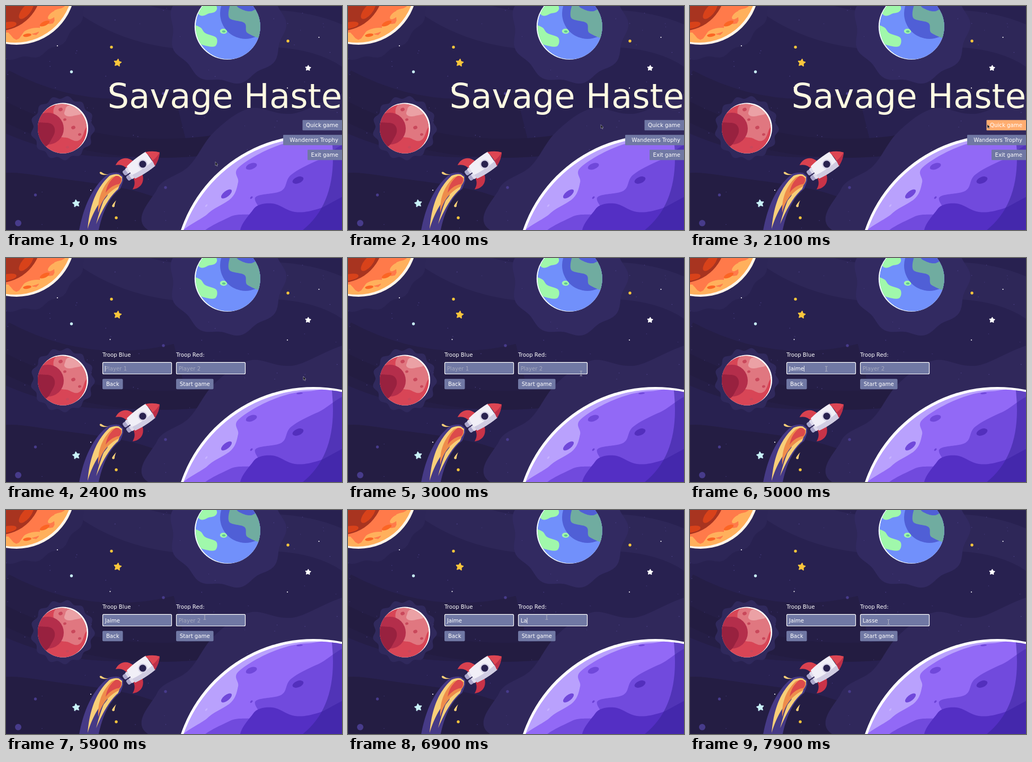
An HTML page for the animation above (8 s loop, 634 by 422 pixels).

```html
<!DOCTYPE html>
<html lang="en">
<head>
<meta charset="utf-8">
<title>Space menu</title>
<style>
  html, body { margin: 0; width: 100%; height: 100%; overflow: hidden; background: #282150; }
  svg { display: block; width: 100%; height: 100%; }
  text { font-family: "DejaVu Sans", sans-serif; font-size: 10.2px; fill: #fff; white-space: pre; }
</style>
</head>
<body>
<svg id="stage" viewBox="0 0 634 422" xmlns="http://www.w3.org/2000/svg">
  <g id="sky"></g>
  <g id="planets"></g>
  <g id="flame"></g>
  <g transform="translate(258 298) rotate(-35)">
    <g id="fins"></g>
    <path d="M-27-14Q-5-18 18-16V16Q-5 18-27 14Q-30 0-27-14Z" fill="#f1eff7"/>
    <path d="M-28 5Q-4 9 19 6L18 16Q-5 18-27 14Z" fill="#d0cce2"/>
    <path d="M17-16Q31-10 39 0Q31 10 17 16Q21 0 17-16Z" fill="#dd4653"/>
    <path d="M19 5Q28 5 39 0Q31 10 17 16Z" fill="#bd2f48"/>
    <circle r="9" fill="#d8d4e8"/>
    <circle r="6.600" fill="#29224f"/>
  </g>
  <g id="stars"></g>
  <g id="menu">
    <text x="634" y="192" text-anchor="end" style="font-size:64px;fill:#fffbe2">Savage Haste</text>
  </g>
  <g id="form">
    <text x="182" y="185.500">Troop Blue</text>
    <text x="321" y="185.500">Troop Red:</text>
  </g>
  <path id="arrow" d="M0 0V7.200L1.700 5.700L2.900 8.300L4 7.800L2.800 5.300H5Z" fill="#111" stroke="#c9c7d6" stroke-width=".55"/>
  <path id="beam" d="M-2.200-4.500H-.6L0-4L.6-4.500H2.200M0-4V4M-2.200 4.500H-.6L0 4L.6 4.500H2.200" fill="none" stroke="#b9bac6" stroke-width=".9"/>
</svg>
<script>
const $ = id => document.getElementById(id);

function add(parent, tag, attrs, text) {
  const el = document.createElementNS("http://www.w3.org/2000/svg", tag);
  for (const k in attrs) el.setAttribute(k, attrs[k]);
  if (text) el.textContent = text;
  return (typeof parent === "string" ? $(parent) : parent).appendChild(el);
}
const dot = (g, fill, cx, cy, r) => add(g, "circle", { cx, cy, r, fill });
const oval = (g, fill, cx, cy, rx, ry, turn = 0) =>
  add(g, "ellipse", { cx, cy, rx, ry, fill, transform: `rotate(${turn} ${cx} ${cy})` });
const polygon = (g, fill, points, more) => add(g, "polygon", { points: points.join(" "), fill, ...more });
const band = (stroke, width, d) => add("sky", "path", { d, stroke, "stroke-width": width, fill: "none" });

// Closed smooth curve through "x,y x,y ..." points.
function blob(g, fill, points) {
  const p = points.split(" ").map(s => s.split(",").map(Number));
  const at = i => p[(i + p.length) % p.length];
  let d = "M" + p[0];
  p.forEach((a, i) => {
    const [z, b, c] = [at(i - 1), at(i + 1), at(i + 2)];
    const h1 = a.map((v, k) => v + (b[k] - z[k]) / 6);
    const h2 = b.map((v, k) => v - (c[k] - a[k]) / 6);
    d += `C${h1} ${h2} ${b}`;
  });
  return add(g, "path", { d: d + "Z", fill });
}

// Ellipse with a rippled edge.
function ripple(g, fill, cx, cy, rx, ry, lobes, depth, phase = 0) {
  const points = [...Array(120).keys()].map(i => {
    const a = i * Math.PI / 60, q = 1 + depth * Math.sin(a * lobes + phase);
    return [cx + rx * q * Math.cos(a), cy + ry * q * Math.sin(a)];
  });
  return polygon(g, fill, points);
}

// Round-headed streak along a quadratic curve; taper 1 ends in a point.
function streak(fill, from, bend, to, width, taper = 1) {
  const left = [], right = [];
  for (let i = 0; i <= 30; i++) {
    const s = i / 30, r = 1 - s;
    const [x, y] = [0, 1].map(k => r * r * from[k] + 2 * r * s * bend[k] + s * s * to[k]);
    const [dx, dy] = [0, 1].map(k => r * (bend[k] - from[k]) + s * (to[k] - bend[k]));
    const w = width * Math.sqrt(Math.min(1, 6 * s)) * (1 - taper * s) / Math.hypot(dx, dy);
    left.push([x - dy * w, y + dx * w]);
    right.unshift([x + dy * w, y - dx * w]);
  }
  polygon("flame", fill, [...left, ...right]);
}

// Rim circle with the body shifted inside it, so the rim shows on one side.
function planet(id, rim, fill, cx, cy, r, dx, dy, inset) {
  const clip = add("planets", "clipPath", { id: "clip-" + id });
  dot(clip, fill, cx, cy, r);
  dot("planets", rim, cx, cy, r);
  const outer = add("planets", "g", { "clip-path": `url(#clip-${id})` });
  const body = add("planets", "clipPath", { id: "body-" + id });
  dot(body, fill, cx + dx, cy + dy, r - inset);
  const g = add(outer, "g", { "clip-path": `url(#body-${id})` });
  dot(g, fill, cx + dx, cy + dy, r);
  return g;
}

function drawSky() {
  band("#251e46", 110, "M-20 170Q150 260 330 215");
  band("#2e2758", 70, "M150-20Q260 60 420 45T660 90");
  band("#231c41", 36, "M-20 190Q130 270 300 268T440 215");
  blob("sky", "#241d43", "-30,325 100,325 290,365 310,450 -30,450");
  blob("sky", "#30285b", "288,430 285,345 345,302 392,238 460,193 540,203 680,175 680,450");
  ripple("sky", "#2d2657", 20, -37, 136, 136, 16, .025);
  ripple("sky", "#322a61", 418, 39, 107, 105, 9, .04, 2);
  ripple("sky", "#30295c", 107, 230, 58, 58, 13, .05, 1);

  let seed = 17;
  const rnd = () => (seed = seed * 16807 % 2147483647) / 2147483647;
  for (let i = 0; i < 85; i++) dot("sky", "#51468f", rnd() * 634, rnd() * 422, .5 + rnd() * .3);
}

function drawOrange() {
  const g = planet("orange", "#fff6ea", "#ffb05c", 20, -37.6, 110.6, -3, -3, 1);
  ripple(g, "#ff7a4a", 14, -42, 99, 99, 17, .07, 1);
  oval(g, "#ffb05c", 50, 47, 17, 5, -12);
  oval(g, "#ffb05c", 88, 17, 11, 5, -40);
  oval(g, "#fb6524", 40, 55, 8, 3, -8);
  oval(g, "#fb6524", 73, 33, 10, 4, -25);
  dot(g, "#a83420", -15, -35, 82);
  oval(g, "#d8421a", 38, 9, 19, 8, -50);
  oval(g, "#d8421a", 4, 36, 16, 6, -10);
}

function drawEarth() {
  const g = planet("earth", "#f4fbff", "#7190fb", 417.8, 39, 62, 2, -.5, 0);
  const land = "#a0f8ab", shade = "#70aca0";
  ripple(g, land, 378, 2, 17, 16, 3, .2, 1);
  blob(g, land, "345,35 366,40 376,51 397,60 394,76 370,73 350,62");
  oval(g, land, 410.5, 47.5, 6.8, 4.8, 5);
  oval(g, "#62c598", 411, 48, 3.4, 2, 5);
  dot(g, "#505fd6", 452, 14, 48);
  blob(g, shade, "426,-8 421,22 450,32 456,51 490,58 490,0 462,10 440,4");
}

function drawRed() {
  const g = planet("red", "#fff", "#d84556", 107.5, 230, 47.5, -2, 1.5, .5);
  ripple(g, "#e07780", 123, 213, 34, 40, 5, .09, 2);
  ripple(g, "#eba1a5", 126, 198, 17, 10, 3, .14, 1);
  dot(g, "#b42e4b", 79, 231, 30);
  ripple(g, "#98213f", 71, 240, 20, 23, 3, .12, 3);
  for (const [x, y, r] of [[103, 195, 4], [127, 229, 4], [111, 214, 3], [139, 242, 3], [116, 266, 3]])
    oval(g, "#c9485b", x, y, r, r * .8, -20);
}

function drawPurple() {
  const g = planet("purple", "#fff", "#b9a1fd", 580, 507, 264, 3, 4, .5);
  blob(g, "#9269f6", "345,440 380,392 425,362 438,332 438,305 500,268 570,251 660,262 660,440");
  blob(g, "#714add", "380,440 423,397 478,390 471,360 520,348 538,318 590,290 660,265 660,440");
  blob(g, "#542fc4", "455,440 466,384 502,372 545,388 590,382 660,355 660,440");
  oval(g, "#7048da", 463, 302, 11, 5.5, -20);
  oval(g, "#532fbd", 551, 328, 11, 6, -22);
  oval(g, "#7048da", 416, 354, 12, 5.5, -38);
  oval(g, "#7048da", 554, 255, 6, 1.6, -6);
  oval(g, "#c8b4ff", 378, 376, 3, 1.4, -48);
  oval(g, "#6c43d6", 463, 361, 3, 1.6, -45);
  add(g, "path", { d: "M613 235Q632 365 560 422H634V235Z", fill: "#38239a", opacity: .55 });
}

function drawFlame() {
  const yellow = "#f8cf79", glow = "#463a86";
  streak(glow, [221, 320], [168, 345], [154, 436], 18, 0);
  streak(yellow, [219, 322], [168, 344], [154, 420], 16);
  streak(yellow, [213, 333], [190, 352], [170, 411], 9);
  streak(glow, [192, 355], [176, 370], [167, 405], 2);
  streak("#ee8c4b", [218, 324], [178, 345], [174, 390], 13);
  streak("#dc4a4b", [217, 325], [196, 332], [188, 352], 10);
  streak(yellow, [177, 313], [184, 319], [193, 317], 2.5);
  streak(yellow, [202, 379], [203, 373], [208, 366], 3);
}

function drawFins() {
  for (const side of [1, -1]) {
    const g = add("fins", "g", { transform: `scale(1 ${side})` });
    add(g, "path", { d: "M-11-14C-16-31-30-35-43-28C-34-24-30-18-29-9Z", fill: side > 0 ? "#d9414f" : "#c93348" });
    add(g, "rect", { x: -40, y: -11, width: 15, height: 10, rx: 3, fill: "#aaa6cb" });
    add(g, "rect", { x: -33, y: -12, width: 6, height: 11, rx: 2, fill: "#dedbec" });
  }
}

function star(fill, cx, cy, r, turn) {
  const points = [...Array(10).keys()].map(i => {
    const a = (i * 36 - 90 + turn) * Math.PI / 180, q = i % 2 ? r * .5 : r;
    return [cx + q * Math.cos(a), cy + q * Math.sin(a)];
  });
  polygon("stars", fill, points, { stroke: fill, "stroke-width": 1.8, "stroke-linejoin": "round" });
}

function drawStars() {
  star("#fbc63c", 210.7, 107, 6.8, 8);
  star("#fff", 570, 117, 4.8, 5);
  star("#c9f2f8", 132.5, 372, 6.6, -8);
  const dots = (fill, r, ...spots) => spots.forEach(([x, y]) => dot("stars", fill, x, y, r));
  dots("#fbc63c", 2.7, [199, 77.5], [532, 66], [208, 399]);
  dots("#473b8b", 2.7, [297, 165], [301, 342], [55.5, 356]);
  dots("#fff", 1.1, [97, 75], [196.5, 153.5], [531, 154.5], [590.5, 59], [160, 347]);
  dots("#c9f2f8", 2.7, [123.5, 124]);
  dots("#473b8b", 6, [23, 409]);
}

const PANEL = "#7078a4";

function button(g, x, y, width, label, rightSide) {
  const box = add(g, "rect", { x, y, width, height: 19.5, rx: rightSide ? 1 : 2, fill: PANEL });
  add(g, "text", rightSide
    ? { x: 627, y: y + 13.6, "text-anchor": "end" }
    : { x: x + width / 2, y: y + 13.4, "text-anchor": "middle" }, label);
  return box;
}

// The first letter comes at `first`, the others from `next` on, every `step` ms.
function field(x, hint, value, first, next, step) {
  add("form", "rect", { x: x + .5, y: 196.7, width: 130, height: 21.8, rx: 2, fill: PANEL, stroke: "#fff", "stroke-width": 1.2 });
  const text = add("form", "text", { x: x + 4.7, y: 211.8 });
  const caret = add("form", "rect", { y: 203, width: 1, height: 11, fill: "#e6e7ef" });
  const keys = [...value].map((_, i) => i ? next + (i - 1) * step : first);
  return (t, focusAt, blurAt) => {
    const done = keys.filter(k => k <= t);
    const typed = value.slice(0, done.length);
    text.textContent = typed || hint;
    text.style.fill = typed ? "#fff" : "#a4a8bd";
    caret.setAttribute("x", x + 4.6 + (typed ? text.getComputedTextLength() : 0));
    const blink = (t - Math.max(focusAt, ...done)) % 1000 < 500;
    show(caret, t >= focusAt && t < blurAt && blink);
  };
}

const show = (el, on) => el.setAttribute("display", on ? "inline" : "none");

drawSky();
drawOrange();
drawEarth();
drawRed();
drawPurple();
drawFlame();
drawFins();
drawStars();

const quick = button("menu", 559.5, 214.7, 76, "Quick game", true);
button("menu", 523, 242.7, 112, "Wanderers Trophy", true);
button("menu", 569, 270.7, 66, "Exit game", true);
const blue = field(182, "Player 1", "Jaime", 3900, 4100, 160);
const red = field(321, "Player 2", "Lasse", 6500, 6900, 100);
button("form", 182, 227.7, 38.5, "Back");
button("form", 321, 227.7, 70.5, "Start game");

// Pointer moves: from time, to time, end x, end y.
const moves = [
  [500, 1400, 477, 223.5], [1400, 2100, 561, 223], [2700, 3400, 253, 209],
  [4900, 5800, 375, 201.7], [7800, 7900, 374.5, 211]
];
function pointer(t) {
  let x = 395, y = 293.5;
  for (const [t0, t1, x1, y1] of moves) {
    const u = Math.min(1, Math.max(0, (t - t0) / (t1 - t0))), e = u * u * (3 - 2 * u);
    x += (x1 - x) * e;
    y += (y1 - y) * e;
  }
  return [x, y];
}

function render(ms) {
  const t = Math.floor(ms % 8000 / 100) * 100;
  const inForm = t >= 2400;
  const [x, y] = pointer(t);
  show($("menu"), !inForm);
  show($("form"), inForm);
  quick.setAttribute("fill", x > 559.5 ? "#ffad70" : PANEL);
  blue(t, 2400, 5600);
  red(t, 6000, 8000);

  const within = left => x > left && x < left + 131;
  const overField = inForm && y > 196 && y < 219 && (within(182) || within(321));
  show($("arrow"), !overField);
  show($("beam"), overField);
  $(overField ? "beam" : "arrow").setAttribute("transform", `translate(${x} ${y})`);
}

const start = performance.now();
function tick() {
  render(performance.now() - start);
  requestAnimationFrame(tick);
}
tick();
</script>
</body>
</html>
```
